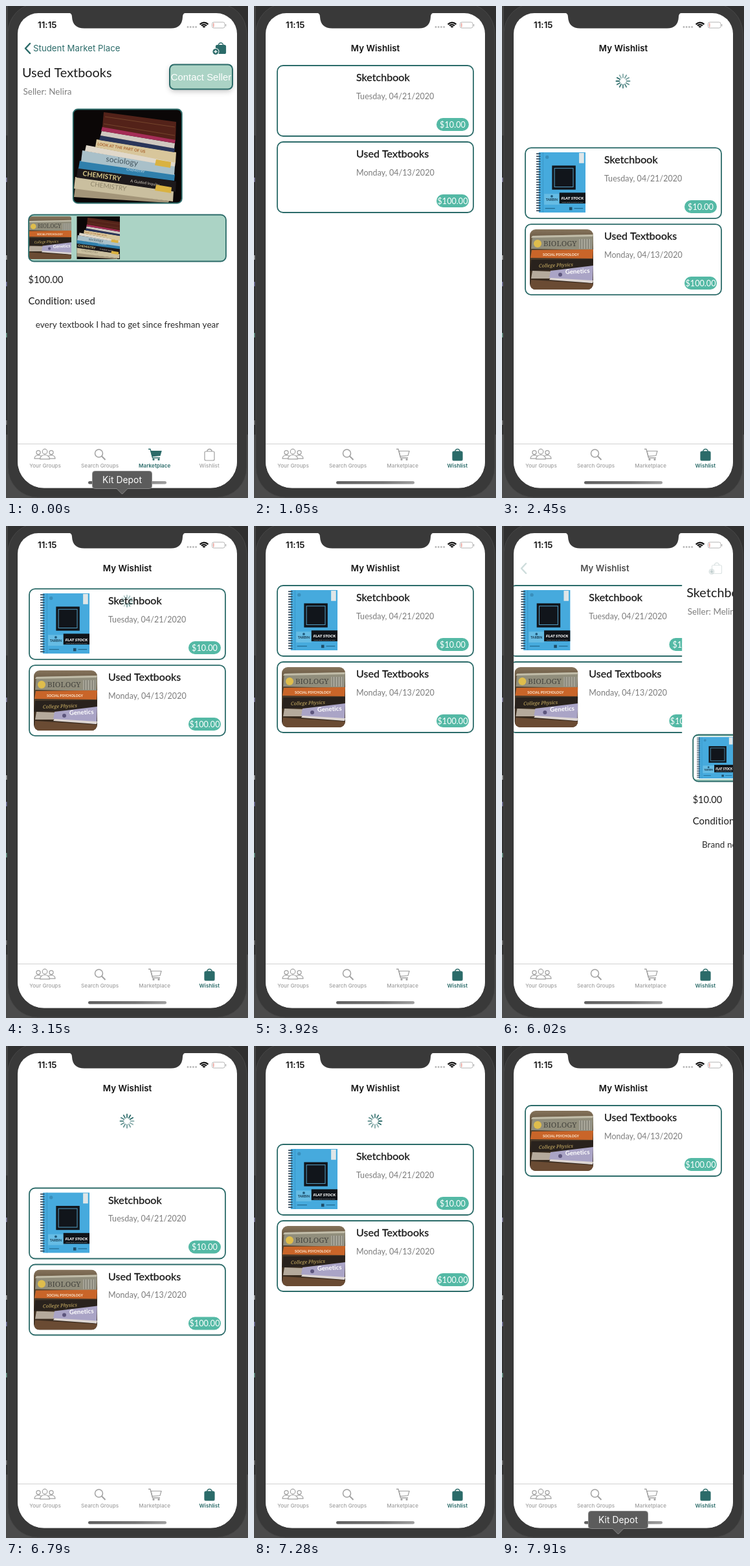
These frames come from a looping animation (374x760 px, 8.05 s). An HTML page with a canvas:

```html
<!DOCTYPE html>
<html lang="en">
<head>
<meta charset="utf-8">
<title>Wishlist demo</title>
<style>
html, body { margin: 0; width: 100%; height: 100%; overflow: hidden; background: #393939; }
canvas { display: block; width: 374px; height: 760px; }
</style>
</head>
<body>
<canvas id="stage"></canvas>
<script>
const W = 374, H = 760, LOOP = 8050;
const SCREEN = { x: 18, y: 11, w: 339, h: 733.5 };
const TEAL = '#2b6b69', MINT = '#abd3c5', GREY = '#a0a0a0', BEZEL = '#393939';
const UI = 'Inter, sans-serif', BODY = 'Lato, sans-serif', PLAIN = '"Liberation Sans", sans-serif';
const canvas = document.getElementById('stage');
const c = canvas.getContext('2d');
const dpr = window.devicePixelRatio || 1;
canvas.width = W * dpr;
canvas.height = H * dpr;

const clamp = (v, a = 0, b = 1) => Math.min(b, Math.max(a, v));

// Value along [time, value] keys, eased between neighbours
function track(t, keys) {
  if (t <= keys[0][0]) return keys[0][1];
  for (let i = 1; i < keys.length; i++) {
    const [t0, v0] = keys[i - 1], [t1, v1] = keys[i];
    if (t < t1) {
      const u = (t - t0) / (t1 - t0);
      return v0 + (v1 - v0) * (1 - (1 - u) ** 2);
    }
  }
  return keys[keys.length - 1][1];
}

// Critically damped spring from 0 to 1
function spring(t, start) {
  const s = Math.max(0, t - start) * 0.01825;
  return 1 - (1 + s) * Math.exp(-s);
}

function group(draw, alpha = 1) {
  c.save();
  c.globalAlpha *= alpha;
  draw();
  c.restore();
}

function text(str, x, y, size, color, o = {}) {
  c.font = `${o.style || ''} ${o.weight || 400} ${size}px ${o.font || BODY}`;
  c.letterSpacing = '0.05px'; // keeps ligatures off
  c.textAlign = o.align || 'left';
  c.textBaseline = 'alphabetic';
  c.fillStyle = color;
  c.fillText(str, x, y);
}

function slanted(str, x, y, angle, size, color, o) {
  group(() => {
    c.translate(x, y);
    c.rotate(angle);
    text(str, 0, 0, size, color, o);
  });
}

function rect(x, y, w, h, color) {
  c.fillStyle = color;
  c.fillRect(x, y, w, h);
}

function box(x, y, w, h, r, fill, stroke, lw = 2) {
  c.beginPath();
  c.roundRect(x, y, w, h, r);
  if (fill) { c.fillStyle = fill; c.fill(); }
  if (stroke) { c.strokeStyle = stroke; c.lineWidth = lw; c.stroke(); }
}

function clipBox(x, y, w, h, r) {
  c.beginPath();
  c.roundRect(x, y, w, h, r);
  c.clip();
}

function disc(x, y, r, color) {
  c.beginPath();
  c.arc(x, y, r, 0, Math.PI * 2);
  c.fillStyle = color;
  c.fill();
}

function line(pts, color, lw, close) {
  c.beginPath();
  pts.forEach(([x, y], i) => i ? c.lineTo(x, y) : c.moveTo(x, y));
  if (close) c.closePath();
  c.strokeStyle = color;
  c.lineWidth = lw;
  c.stroke();
}

// ---- pictures ----

function photo(x, y, w, h, r, pw, ph, draw) {
  group(() => {
    clipBox(x, y, w, h, r);
    const s = Math.max(w / pw, h / ph);
    c.translate(x + (w - pw * s) / 2, y + (h - ph * s) / 2);
    c.scale(s, s);
    draw();
  });
}

function spine(xl, yl, xr, yr, hl, hr, color) {
  c.beginPath();
  c.moveTo(xl, yl);
  c.lineTo(xr, yr);
  c.lineTo(xr - 1, yr + hr);
  c.lineTo(xl - 2, yl + hl);
  c.closePath();
  c.fillStyle = color;
  c.fill();
}

function tallStack() {
  rect(0, 0, 167, 144, '#0b0707');
  spine(3, 120, 148, 141, 15, 3, '#a39579');
  spine(3, 104, 155, 126, 18, 16, '#cabf9f');
  spine(7, 90, 159, 111, 15, 16, '#1d191b');
  spine(10, 79, 157, 100, 12, 10, '#2f7fac');
  spine(14, 63, 157, 87, 17, 14, '#a9c0c9');
  spine(20, 55, 158, 81, 9, 7, '#e0d8ca');
  spine(36, 46, 159, 66, 12, 16, '#d8c69b');
  spine(42, 40, 157, 60, 7, 6, '#29355a');
  spine(44, 33, 157, 52, 7, 8, '#d0c8c0');
  spine(45, 26, 158, 46, 7, 6, '#a52c57');
  spine(47, 4, 159, 19, 23, 28, '#532219');
  line([[49, 11], [157, 27]], '#74442c', 1);
  line([[47, 22], [157, 40]], '#74442c', 1);
  slanted('LOOK AT THE PART OF US', 37, 55, 0.16, 6, '#a8622f', { weight: 700 });
  slanted('sociology', 50, 80, 0.14, 12, '#41545e');
  slanted('CHEMISTRY', 82, 94, 0.14, 5, '#e4edf2');
  slanted('CHEMISTRY', 14, 102, 0.14, 10.5, '#d9c98a', { weight: 700 });
  slanted('CHEMISTRY', 26, 118, 0.14, 10, '#8f856b');
  slanted('A Guided Inquiry', 88, 112, 0.14, 6, '#d9d2c4');
  spine(128, 77, 151, 81, 9, 9, '#d9b241');
  spine(128, 116, 152, 120, 9, 9, '#d9b241');
}

function shortStack() {
  const bg = c.createLinearGradient(0, 0, 0, 93);
  bg.addColorStop(0, '#85735b');
  bg.addColorStop(0.3, '#51422f');
  bg.addColorStop(1, '#34261b');
  rect(0, 0, 98, 93, bg);
  spine(2, 78, 98, 84, 15, 9, '#6a4b33');
  spine(4, 10, 98, 8, 20, 24, '#918e7c');
  spine(4, 10, 98, 8, 3, 3, '#c2bda9');
  rect(76, 15, 20, 15, '#a5a396');
  for (let i = 0; i < 5; i++) rect(78 + i * 4, 15, 1, 15, '#77766b');
  disc(12, 22, 6, '#dfbd4c');
  text('BIOLOGY', 21, 26, 11.5, '#45443e', { font: '"Noto Serif", serif' });
  spine(3, 32, 98, 31, 12, 14, '#c96529');
  text('SOCIAL PSYCHOLOGY', 20, 41, 5.3, '#fff2df', { weight: 700 });
  spine(4, 64, 60, 66, 12, 10, '#b5aa9c');
  spine(2, 47, 98, 46, 17, 15, '#29221d');
  spine(32, 64, 98, 56, 11, 27, '#aaa4c6');
  spine(32, 75, 98, 79, 3, 4, '#ddd6d3');
  slanted('College Physics', 14, 59, -0.04, 7.4, '#d5b868', { font: '"Noto Serif", serif', style: 'italic' });
  slanted('Genetics', 55, 69, -0.05, 9.6, '#fff', { weight: 700 });
  disc(47, 70, 3, '#5d567d');
}

function sketchpad(x, y, w, h) {
  const X = u => x + u * w, Y = v => y + v * h;
  const fill = (a, b, d, e, color) => rect(X(a), Y(b), d * w, e * h, color);
  fill(0, 0, 1, 1, '#fff');
  fill(0.05, 0, 0.95, 1, '#46aadd');
  fill(0.13, 0, 0.012, 1, '#3794c6');
  for (let i = 0; i < 23; i++) fill(0, 0.015 + i * 0.043, 0.085, 0.018, '#2e4456');
  fill(0.87, 0.01, 0.1, 0.17, '#dfe6e8');
  disc(X(0.22), Y(0.08), 0.035 * w, '#398ebb');
  fill(0.32, 0.22, 0.48, 0.4, '#11151b');
  c.strokeStyle = '#4f96ba';
  c.lineWidth = 0.014 * w;
  c.strokeRect(X(0.37), Y(0.265), 0.38 * w, 0.31 * h);
  fill(0.16, 0.69, 0.31, 0.18, '#66bce4');
  text('TARBIN', X(0.315), Y(0.81), w * 0.066, '#16364b', { align: 'center', weight: 700 });
  disc(X(0.315), Y(0.73), w * 0.025, '#205a7c');
  fill(0.47, 0.67, 0.53, 0.18, '#101419');
  text('FLAT STOCK', X(0.735), Y(0.79), w * 0.081, '#fff', { align: 'center', weight: 900, style: 'italic' });
  text('smooth sheets for wet or dry work', X(0.735), Y(0.835), w * 0.027, '#cfe5ef', { align: 'center' });
  fill(0.18, 0.925, 0.2, 0.012, '#20658a');
  fill(0.67, 0.91, 0.06, 0.05, '#1f4d68');
  fill(0.77, 0.925, 0.18, 0.012, '#20658a');
}

function swatches(x, y) {
  rect(x, y, 67, 66, '#fff');
  rect(x + 23, y + 2, 27, 1, '#bbb');
  const colors = ['#69645f', '#b87645', '#b08b6a', '#75848b', '#b77b91', '#80585c', '#99a044', '#52a5cf'];
  colors.forEach((color, i) => {
    const cx = x + 23.5 + (i % 2) * 21, cy = y + 11 + (i >> 1) * 15;
    disc(cx, cy, 6.3, color);
    c.beginPath();
    c.arc(cx, cy, 4, 0.3 + i, 2.6 + i);
    c.strokeStyle = 'rgba(255,255,255,.4)';
    c.lineWidth = 1.5;
    c.stroke();
  });
}

// ---- icons ----

function bag(x, y, filled, color, w = 15, h = 13) {
  c.beginPath();
  c.arc(x, y - h / 2, 3.6, Math.PI, 0);
  c.strokeStyle = color;
  c.lineWidth = 1.5;
  c.stroke();
  box(x - w / 2, y - h / 2, w, h, 2, filled ? color : null, color, 1.2);
}

function addBag(filled) {
  const color = filled ? TEAL : '#6f8f8e';
  bag(332, 67, filled, color);
  disc(324, 70.5, 5.5, '#fff');
  disc(324, 70.5, 4.5, color);
  if (!filled) disc(324, 70.5, 3.5, '#fff');
  const plus = filled ? '#fff' : color;
  line([[321.5, 70.5], [326.5, 70.5]], plus, 1.3);
  line([[324, 68], [324, 73]], plus, 1.3);
}

function person(x, y, s) {
  c.beginPath();
  c.arc(x, y - 5 * s, 3.6 * s, 0, Math.PI * 2);
  c.moveTo(x - 7 * s, y + 6 * s);
  c.bezierCurveTo(x - 7 * s, y - 2 * s, x + 7 * s, y - 2 * s, x + 7 * s, y + 6 * s);
  c.closePath();
  c.fillStyle = '#fff';
  c.fill();
  c.strokeStyle = GREY;
  c.lineWidth = 1.2;
  c.stroke();
}

function cart(x, y, active) {
  const color = active ? TEAL : GREY;
  const basket = [[x - 6, y - 5], [x + 10, y - 5], [x + 8, y + 2], [x - 4, y + 3]];
  line([[x - 10, y - 8], [x - 7, y - 8], [x - 3.5, y + 5.5], [x + 8, y + 5.5]], color, 1.3);
  line(basket, color, 1.2, true);
  if (active) { c.fillStyle = color; c.fill(); }
  disc(x - 2, y + 8, 1.6, color);
  disc(x + 6, y + 8, 1.6, color);
}

function spinner(t, shown, size, alpha) {
  group(() => {
    c.translate(187, 116);
    c.scale(size, size);
    c.lineCap = 'round';
    const head = Math.floor(t / 35) % 12;
    for (let i = 0; i < shown; i++) {
      const a = i * Math.PI / 6 - Math.PI / 2;
      const age = (head - i + 12) % 12;
      c.globalAlpha = alpha * (1 - age * 0.045);
      line([[5.5 * Math.cos(a), 5.5 * Math.sin(a)], [10.5 * Math.cos(a), 10.5 * Math.sin(a)]], TEAL, 1.9);
    }
  });
}

// ---- pages ----

const ITEMS = {
  pad: {
    title: 'Sketchbook', seller: 'Melinora Prastow', date: 'Tuesday, 04/21/2020', price: '$10.00', state: 'new',
    lines: ['Brand new sketchbook. 10x7, 60 sheets. Spiral', 'bound, soft cover.'],
    cover: () => sketchpad(121, 161, 129, 140),
    thumbs: () => { rect(36, 325, 66, 66, '#fff'); sketchpad(41, 326, 57, 64); swatches(110, 325); },
    card: y => sketchpad(53, y + 7, 76, 93)
  },
  books: {
    title: 'Used Textbooks', seller: 'Nelira', date: 'Monday, 04/13/2020', price: '$100.00', state: 'used',
    lines: ['every textbook I had to get since freshman year'],
    cover: () => photo(104, 160, 167, 144, 6, 167, 144, tallStack),
    thumbs: () => {
      photo(36, 325, 65, 66, 3, 98, 93, shortStack);
      photo(109.5, 325, 66.5, 66, 0, 167, 144, tallStack);
    },
    card: y => photo(43, y + 8, 98, 93, 9, 98, 93, shortStack)
  }
};

function detail(item, dx) {
  group(() => {
    c.translate(dx, 0);
    rect(18, 82, 339, 594, '#fff');
    text(item.title, 25, 110, 19.8, '#1c1c1c');
    text('Seller: ' + item.seller, 26.5, 137, 13.4, '#7d7d7d');
    group(() => {
      c.shadowColor = 'rgba(0,0,0,.25)';
      c.shadowBlur = 9;
      c.shadowOffsetY = 3;
      box(253, 90.5, 97, 38, 7, MINT);
    });
    box(253, 90.5, 97, 38, 7, MINT, TEAL, 2);
    text('Contact Seller', 301.5, 115, 14.8, '#fff', { align: 'center', font: PLAIN });
    item.cover();
    box(103.8, 159.5, 168, 145, 7, null, TEAL, 1.8);
    box(35, 322.5, 305, 72, 8, MINT);
    item.thumbs();
    box(35, 322.5, 305, 72, 8, null, TEAL, 1.8);
    text(item.price, 34.5, 428, 14.4, '#1c1c1c');
    text('Condition: ' + item.state, 34.5, 461, 14.9, '#1c1c1c');
    item.lines.forEach((s, i) => text(s, 187.5, 496.5 + i * 18, 13.5, '#2a2a2a', { align: 'center' }));
  });
}

function card(item, y, withPicture) {
  box(36, y, 303, 109, 9, '#fff', TEAL, 1.8);
  if (withPicture) item.card(y);
  text(item.title, 158, y + 24, 16, '#151515');
  c.strokeStyle = '#151515';
  c.lineWidth = 0.3;
  c.strokeText(item.title, 158, y + 24);
  text(item.date, 158, y + 51.5, 12.5, '#7c7c7c');
  box(282, y + 81, 50, 20, 10, '#54b9a5');
  text(item.price, 307, y + 95.5, 12.6, '#fff', { align: 'center' });
}

function wishlist(t, dx) {
  const pull = track(t, [[2130, 0], [2450, 127], [2520, 128], [2700, 60], [2970, 60], [3225, 0]]) +
    track(t, [[6470, 0], [6790, 127.5], [6860, 128], [7040, 60], [7350, 60], [7605, 0]]);
  group(() => {
    c.translate(dx, 0);
    if (t >= 1050) {
      const top = 92 + pull;
      if (t < 7390) card(ITEMS.pad, top, t >= 1260);
      card(ITEMS.books, t < 7390 ? top + 118 : top, t >= 1610);
    }
    if (pull > 1) {
      const end = t < 5000 ? 2970 : 7350;
      const gone = clamp((t - end) / 255);
      const opening = t < end - 520;
      const shown = opening ? Math.floor(clamp((pull - 25) / 75) * 12) : 12;
      spinner(t, shown, 1 - gone * 0.2, 1 - gone * 0.5);
    }
  });
}

function backLink(label, chevronAlpha, labelAlpha, dx) {
  group(() => {
    c.lineCap = c.lineJoin = 'round';
    line([[37, 58], [30, 65.5], [37, 73]], TEAL, 2.5);
  }, chevronAlpha);
  group(() => text(label, 42 + dx, 70, 13.2, TEAL, { font: UI }), labelAlpha);
}

function navBar(t, p, onWishlist) {
  if (!onWishlist) {
    backLink('Student Market Place', 1, 1, 0);
    addBag(true);
    return;
  }
  group(() => text('My Wishlist', 187.5 - 123 * p, 70, 13.3, '#111', { align: 'center', weight: 600, font: UI }),
    clamp(1 - p * 1.1));
  if (p < 0.004) return;
  backLink('My Wishlist', p, clamp((p - 0.4) / 0.6), 60 * (1 - p));
  group(() => addBag(t < 4900), p);
}

function tabBar(t, onWishlist) {
  rect(18, 676, 339, 69, '#fff');
  rect(18, 676, 339, 1, '#d2d2d2');
  person(50, 694, 0.85);
  person(70, 694, 0.85);
  person(60, 693.5, 1.05);
  c.beginPath();
  c.arc(143.5, 691, 6, 0, Math.PI * 2);
  c.strokeStyle = GREY;
  c.lineWidth = 1.5;
  c.stroke();
  line([[148, 695.5], [153.5, 701]], GREY, 2);
  cart(230, 692.5, !onWishlist);
  bag(314.5, 695, onWishlist, onWishlist ? TEAL : GREY, 15, 14);
  ['Your Groups', 'Search Groups', 'Marketplace', 'Wishlist'].forEach((label, i) => {
    const on = i === (onWishlist ? 3 : 2);
    text(label, 60.5 + i * 84.6, 713, 8.1, on ? TEAL : GREY, { align: 'center', weight: on ? 600 : 500, font: UI });
  });
  const g = c.createLinearGradient(127, 0, 248, 0);
  const dark = t > 4150 && t < 5700;
  g.addColorStop(0, dark ? '#080808' : '#606060');
  g.addColorStop(0.6, dark ? '#080808' : '#777');
  g.addColorStop(1, dark ? '#080808' : '#a0a0a0');
  box(127, 734, 121, 4.5, 2.2, g);
}

function statusBar() {
  text('11:15', 49, 34, 13.3, '#111', { weight: 600, font: UI });
  for (let i = 0; i < 4; i++) disc(281 + i * 4.2, 32.5, 1.4, '#b9b9b9');
  c.lineCap = 'butt';
  [2, 5.2, 8.4].forEach(r => {
    c.beginPath();
    c.arc(306, 34, r, -Math.PI * 0.77, -Math.PI * 0.23);
    c.strokeStyle = '#111';
    c.lineWidth = 2.3;
    c.stroke();
  });
  box(318.5, 25, 19.5, 9, 2.6, '#fff', '#b5b5b5', 1);
  rect(320, 26.5, 1.5, 6, '#e9a098');
  rect(339, 28, 1.3, 3.4, '#b5b5b5');
}

function notch() {
  c.beginPath();
  c.moveTo(96, 10);
  c.quadraticCurveTo(102, 11, 102, 17);
  c.quadraticCurveTo(103, 34.5, 121, 34.5);
  c.lineTo(255, 34.5);
  c.quadraticCurveTo(272, 34.5, 273, 17);
  c.quadraticCurveTo(273, 11, 279, 10);
  c.closePath();
  c.fillStyle = BEZEL;
  c.fill();
}

function phoneBody() {
  rect(0, 0, W, H, '#303030');
  rect(0, 0, 3, 200, '#444');
  rect(0, 662, W, 98, '#4b4b4b');
  [[265, '#8b86a8'], [385, '#aaa'], [426, '#7a79a5'], [505, '#6fa08f'], [640, '#777']]
    .forEach(([y, color]) => rect(0, y, 1.5, 7, color));
  box(3, -4, 369, 763, 46, BEZEL, '#474747', 1);
}

function tooltip() {
  box(133.5, 718.5, 92, 27, 4, '#5c5c5c', '#8c8c8c', 1);
  c.beginPath();
  c.moveTo(171, 745);
  c.lineTo(179.5, 754);
  c.lineTo(188, 745);
  c.closePath();
  c.fillStyle = '#5c5c5c';
  c.fill();
  line([[171, 745.5], [179.5, 754], [188, 745.5]], '#8c8c8c', 1);
  text('Kit Depot', 179.5, 737, 13.8, '#fff', { align: 'center', font: UI });
}

function render(t) {
  const onWishlist = t >= 910;
  const p = t < 5000 ? spring(t, 3932) : 1 - spring(t, 5868);
  c.setTransform(dpr, 0, 0, dpr, 0, 0);
  phoneBody();
  group(() => {
    clipBox(SCREEN.x, SCREEN.y, SCREEN.w, SCREEN.h, [32, 32, 41, 41]);
    rect(SCREEN.x, SCREEN.y, SCREEN.w, SCREEN.h, '#fff');
    group(() => {
      c.beginPath();
      c.rect(18, 82, 339, 594);
      c.clip();
      if (!onWishlist) {
        detail(ITEMS.books, 0);
      } else {
        wishlist(t, -0.3 * SCREEN.w * p);
        if (p > 0.001) detail(ITEMS.pad, SCREEN.w * (1 - p));
      }
    });
    navBar(t, p, onWishlist);
    tabBar(t, onWishlist);
    statusBar();
    notch();
  });
  if (t < 140 || t >= 7770) tooltip();
}

const begin = performance.now();
function tick() {
  render((performance.now() - begin) % LOOP);
  requestAnimationFrame(tick);
}
tick();
</script>
</body>
</html>
```
